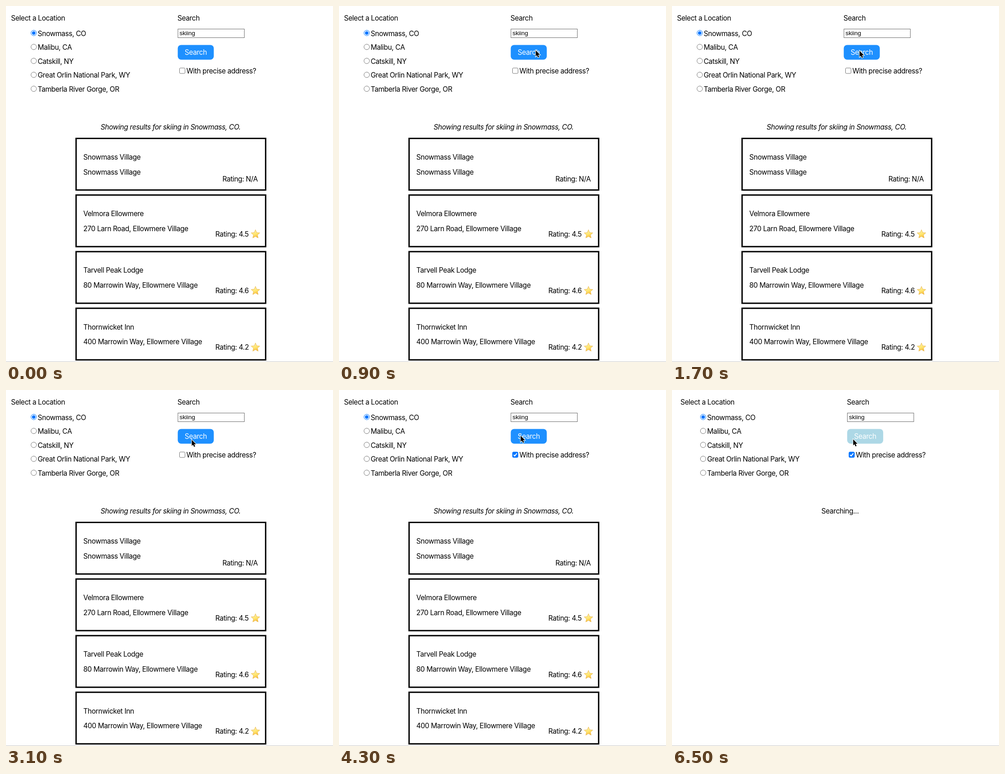
Recreate the animation shown at these times as an HTML page with a canvas. Size 717 by 781 pixels, loop 8000 ms.

```html
<!DOCTYPE html>
<html lang="en">
<head>
<meta charset="utf-8">
<title>Location search</title>
<style>
  html, body { margin: 0; width: 100%; height: 100%; overflow: hidden; background: #fff; }
  canvas { display: block; }
</style>
</head>
<body>
<canvas id="stage" width="717" height="781"></canvas>
<script>
const ctx = document.getElementById('stage').getContext('2d');
const LOOP = 8000;
const UI_FONT = '15.4px Inter, sans-serif';
const BLUE = '#0075ff';

const places = ['Snowmass, CO', 'Malibu, CA', 'Catskill, NY',
  'Great Orlin National Park, WY', 'Tamberla River Gorge, OR'];

const results = [
  { name: 'Snowmass Village', address: 'Snowmass Village' },
  { name: 'Velmora Ellowmere', address: '270 Larn Road, Ellowmere Village', rating: '4.5' },
  { name: 'Tarvell Peak Lodge', address: '80 Marrowin Way, Ellowmere Village', rating: '4.6' },
  { name: 'Thornwicket Inn', address: '400 Marrowin Way, Ellowmere Village', rating: '4.2' }
];

// Pointer positions: time, x, y
const pointerKeys = [
  [400, 638, 386], [500, 452, 166], [600, 430, 142], [700, 408, 110], [800, 420, 98],
  [900, 431, 97], [1100, 431, 97], [1200, 429, 97], [1300, 423.5, 98.5], [1700, 411, 98],
  [3000, 411, 98], [3100, 407, 109], [3300, 390, 135], [3400, 386, 140],
  [3700, 386, 140], [3900, 388, 133], [4200, 397, 103], [4300, 398, 100],
  [6400, 398, 100], [6500, 397, 108], [LOOP, 397, 108]
];

function text(str, x, y, { font = UI_FONT, color = '#000', align = 'left', spacing = -0.4 } = {}) {
  ctx.font = font;
  ctx.letterSpacing = spacing + 'px';
  ctx.textAlign = align;
  ctx.fillStyle = color;
  ctx.fillText(str, x, y);
}

function polygon(points) {
  ctx.beginPath();
  points.forEach(([x, y]) => ctx.lineTo(x, y));
  ctx.closePath();
}

function disc(x, y, r, fill, stroke) {
  ctx.beginPath();
  ctx.arc(x, y, r, 0, Math.PI * 2);
  ctx.fillStyle = fill;
  ctx.fill();
  if (!stroke) return;
  ctx.lineWidth = 1;
  ctx.strokeStyle = stroke;
  ctx.stroke();
}

function roundBox(x, y, w, h, r) {
  ctx.beginPath();
  ctx.roundRect(x, y, w, h, r);
}

function drawPlaces(dx) {
  text('Select a Location', 11 + dx, 32);
  places.forEach((place, i) => {
    const x = 60.8 + dx, y = 59.2 + i * 30.6, chosen = i === 0;
    disc(x, y, 6, '#fff', chosen ? BLUE : '#767676');
    if (chosen) disc(x, y, 3.8, BLUE);
    text(place, 69.5 + dx, Math.round(65.5 + i * 30.6));
  });
}

function drawCheckbox(x, y, checked, hover) {
  roundBox(x, y, 12, 12, 2);
  ctx.lineWidth = 1;
  ctx.fillStyle = checked ? (hover ? '#005cc8' : BLUE) : '#fff';
  ctx.strokeStyle = checked ? ctx.fillStyle : (hover ? '#4f4f4f' : '#767676');
  ctx.fill();
  ctx.stroke();
  if (!checked) return;
  ctx.beginPath();
  ctx.moveTo(x + 2.5, y + 6.2);
  ctx.lineTo(x + 4.9, y + 8.7);
  ctx.lineTo(x + 9.6, y + 2.9);
  ctx.lineWidth = 2;
  ctx.strokeStyle = '#fff';
  ctx.stroke();
}

function drawForm(dx, checked, hover, searching) {
  text('Search', 376 + dx, 32);

  ctx.lineWidth = 1;
  ctx.strokeStyle = '#6b6b6b';
  ctx.strokeRect(377 + dx, 50.5, 145.6, 19);
  text('skiing', 380.5 + dx, 64, { font: '13.33px "Liberation Sans", Arial, sans-serif', spacing: 0 });

  roundBox(376.6 + dx, 85.4, 79, 32.4, 7.5);
  ctx.fillStyle = searching ? '#add8e6' : '#1e90ff';
  ctx.fill();
  text('Search', 391.7 + dx, 107, { color: '#fff' });

  drawCheckbox(380.5 + dx, 136, checked, hover);
  text('With precise address?', 395.5 + dx, 148);
}

function drawStar(cx, cy) {
  const points = Array.from({ length: 10 }, (_, i) => {
    const r = i % 2 ? 4.6 : 10, a = (i / 5 - 0.5) * Math.PI;
    return [cx + r * Math.cos(a), cy + r * Math.sin(a)];
  });
  const glow = ctx.createLinearGradient(cx - 3, cy - 9, cx + 3, cy + 9);
  glow.addColorStop(0, '#fff3a6');
  glow.addColorStop(0.5, '#ffe56e');
  glow.addColorStop(1, '#f5b02c');
  polygon(points);
  ctx.fillStyle = glow;
  ctx.fill();
  ctx.lineJoin = 'round';
  ctx.lineWidth = 0.8;
  ctx.strokeStyle = '#e6b04a';
  ctx.stroke();
  ctx.lineJoin = 'miter';
}

function drawResults() {
  text('Showing results for skiing in Snowmass, CO.', 361, 271,
    { font: 'italic ' + UI_FONT, align: 'center' });
  results.forEach(({ name, address, rating }, i) => {
    const top = 289 + i * 124.2;
    ctx.lineWidth = 3;
    ctx.strokeStyle = '#000';
    ctx.strokeRect(153.7, top + 1.5, 415.6, 113.2);
    text(name, 169.5, Math.round(top + 48));
    text(address, 169.5, Math.round(top + 80.7));
    if (rating) {
      text('Rating: ' + rating, 459, Math.round(top + 92.7));
      drawStar(547, top + 87.6);
    } else {
      text('Rating: N/A', 474.5, 385);
    }
  });
}

function pointerAt(t) {
  const next = pointerKeys.findIndex(key => key[0] > t);
  if (next < 1) return null;
  const [t0, x0, y0] = pointerKeys[next - 1];
  const [t1, x1, y1] = pointerKeys[next];
  const k = (t - t0) / (t1 - t0);
  return [x0 + (x1 - x0) * k, y0 + (y1 - y0) * k];
}

function drawPointer([x, y]) {
  ctx.save();
  ctx.translate(x, y);
  polygon([[0.3, 0.3], [0.3, 13.6], [3.2, 10.9], [5.3, 15.8], [7.7, 14.8], [5.6, 10], [9.7, 10]]);
  ctx.lineWidth = 2;
  ctx.strokeStyle = '#fff';
  ctx.stroke();
  ctx.fillStyle = '#000';
  ctx.fill();
  ctx.restore();
}

function render(now) {
  const t = Math.floor((now % LOOP) / 100) * 100;
  const searching = t >= 5200;
  const dx = searching ? 7.5 : 0; // the scrollbar vanishes with the results
  const hover = t >= 3300 && t < 3900;

  ctx.fillStyle = '#fff';
  ctx.fillRect(0, 0, 717, 781);
  drawPlaces(dx);
  drawForm(dx, t >= 3600, hover, searching);
  if (searching) text('Searching...', 368.5, 271, { align: 'center' });
  else drawResults();
  ctx.fillStyle = '#c6c6c6';
  ctx.fillRect(0, 780, 717, 1);

  const pointer = pointerAt(t);
  if (pointer) drawPointer(pointer);
}

const start = performance.now();
function tick() {
  render(performance.now() - start);
  requestAnimationFrame(tick);
}
tick();
</script>
</body>
</html>
```
